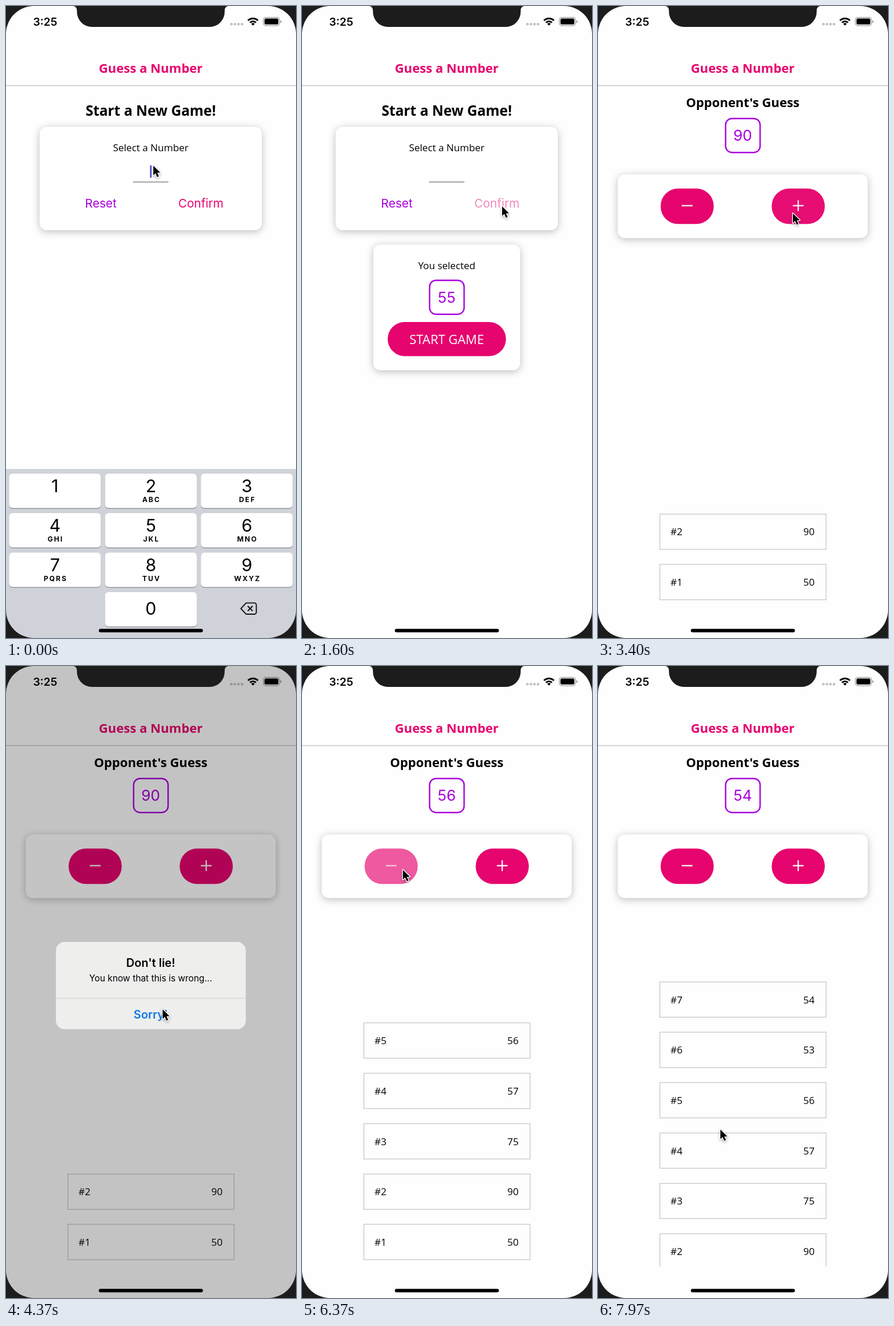
An HTML page with a canvas for the animation above (8000 ms loop, 500x1088 px).

```html
<!DOCTYPE html>
<html lang="en">
<head>
<meta charset="utf-8">
<title>Guess a Number</title>
<style>
  html, body { margin: 0; width: 100%; height: 100%; overflow: hidden; background: #1c1c1c; }
  canvas { display: block; width: 500px; height: 1088px; }
</style>
</head>
<body>
<canvas id="stage"></canvas>
<script>
const W = 500, H = 1088, LOOP = 8000, MID = 249.5;
const PRIMARY = '#e6046e', ACCENT = '#aa00dd', FRAME = '#1c1c1c';
const SANS = '"Open Sans", sans-serif', SYSTEM = 'Inter, sans-serif';

const canvas = document.getElementById('stage');
const ctx = canvas.getContext('2d');
const dpr = window.devicePixelRatio || 1;
canvas.width = W * dpr;
canvas.height = H * dpr;

// Timeline, in ms
const KEYS_TYPED = [300, 560];
const CONFIRMED = 1340;
const GAME_START = 2300;
const ALERT_IN = 3560, ALERT_OUT = 4520;
const DRAG_START = 7690;
const GUESSES = [
  [GAME_START, 50], [3200, 90], [4950, 75], [5230, 57],
  [5850, 56], [6400, 53], [7200, 54]
];
const PLUS_TAPS = [3200, 3550, 7200];
const MINUS_TAPS = [4950, 5230, 5850, 6400];

// Pointer moves: from time, to time, target x, target y
const MOVES = [
  [0, 0, 253, 274],
  [800, 1130, 344, 344],
  [1690, 2010, 262, 574],
  [2670, 3000, 335, 356],
  [3850, 4220, 269, 590],
  [4560, 4840, 173, 350],
  [6600, 7000, 320, 366],
  [7460, 7680, 210, 573],
  [DRAG_START, 7970, 210, 797]
];

const clamp = v => Math.max(0, Math.min(1, v));
const mix = (a, b, k) => a + (b - a) * k;
const ease = (t, from, to) => {
  const k = clamp((t - from) / Math.max(1, to - from));
  return k * k * (3 - 2 * k);
};

// Opacity of a touchable around a tap
function tapFade(t, down, up, low, back = 250) {
  if (t < up) return mix(1, low, ease(t, down, down + 80));
  return mix(low, 1, ease(t, up, up + back));
}

function tapsFade(t, taps) {
  return Math.min(...taps.map(up => tapFade(t, up - 90, up, 0.6)));
}

function pointerAt(t) {
  let [, , x, y] = MOVES[0];
  for (const [from, to, nx, ny] of MOVES) {
    if (t < from) break;
    const k = ease(t, from, to);
    x = mix(x, nx, k);
    y = mix(y, ny, k);
  }
  return { x, y };
}

function faded(alpha, draw) {
  ctx.save();
  ctx.globalAlpha *= alpha;
  draw();
  ctx.restore();
}

function box(x, y, w, h, r, fill, stroke, line = 1.2) {
  ctx.beginPath();
  ctx.roundRect(x, y, w, h, r);
  if (fill) { ctx.fillStyle = fill; ctx.fill(); }
  if (stroke) { ctx.strokeStyle = stroke; ctx.lineWidth = line; ctx.stroke(); }
}

function rule(x1, y1, x2, y2, color, width) {
  ctx.beginPath();
  ctx.moveTo(x1, y1);
  ctx.lineTo(x2, y2);
  ctx.strokeStyle = color;
  ctx.lineWidth = width;
  ctx.stroke();
}

// Text whose capitals are centred on y
function text(str, x, y, size, { family = SANS, weight = 400, color = '#000', align = 'center', gap = 0 } = {}) {
  ctx.font = `${weight} ${size}px ${family}`;
  ctx.textAlign = align;
  ctx.letterSpacing = gap + 'px';
  ctx.fillStyle = color;
  ctx.fillText(str, x, y + size * 0.36);
  ctx.letterSpacing = '0px';
}

function card(x, y, w, h) {
  ctx.save();
  ctx.shadowColor = 'rgba(0,0,0,0.26)';
  ctx.shadowBlur = 14 * dpr;
  ctx.shadowOffsetY = 2.4 * dpr;
  box(x, y, w, h, 12, '#fff');
  ctx.restore();
}

function numberBox(n, y) {
  box(220, y + 1.2, 59.5, 58.5, 11, null, ACCENT, 2.4);
  text(n, MID, y + 30.5, 26, { family: SYSTEM, color: ACCENT });
}

function header() {
  text('Guess a Number', MID, 107.3, 21.75, { weight: 700, color: PRIMARY });
  rule(0, 137, W, 137, '#c8c8c8', 1.4);
}

function startScreen(t) {
  text('Start a New Game!', MID, 180, 24.2, { weight: 700 });
  card(58, 208, 383, 178);
  text('Select a Number', MID, 244, 16.9);
  rule(219, 303, 280, 303, '#888', 1.3);

  if (t < CONFIRMED) {
    const typed = KEYS_TYPED.filter(k => t >= k);
    const half = typed.length * 4.9;
    text('5'.repeat(typed.length), MID, 285, 16, { family: SYSTEM });
    const since = t - (typed[typed.length - 1] || 0);
    if (since % 1000 < 600) box(MID + half - 1.2, 274, 2.6, 22, 1, '#4b52e2');
  }

  text('Reset', 163.5, 339.7, 20.5, { family: SYSTEM, color: ACCENT });
  faded(tapFade(t, 1230, 1530, 0.2, 180), () =>
    text('Confirm', 336, 339.7, 20.5, { family: SYSTEM, color: PRIMARY }));

  if (t >= CONFIRMED) {
    card(123, 410.5, 253, 216.5);
    text('You selected', MID, 447, 16.9);
    numberBox('55', 471);
    faded(tapFade(t, GAME_START - 130, GAME_START, 0.6), () => {
      box(147.7, 544, 204, 58.7, 29.3, PRIMARY);
      text('START GAME', MID, 574, 21.75, { color: '#fff' });
    });
  }
  keyboard(ease(t, CONFIRMED, CONFIRMED + 240) * 292);
}

function keyboard(drop) {
  if (drop > 291) return;
  const letters = ['', 'ABC', 'DEF', 'GHI', 'JKL', 'MNO', 'PQRS', 'TUV', 'WXYZ'];
  const key = (col, row) => {
    const x = 5.3 + col * 165.4, y = 805 + row * 68;
    box(x, y + 1.3, 158.2, 59.3, 6, '#898a8d');
    box(x, y, 158.2, 59.3, 6, '#fff');
    return [x + 79.1, y];
  };
  ctx.save();
  ctx.translate(0, drop);
  ctx.fillStyle = '#d0d2d9';
  ctx.fillRect(0, 797, W, H - 797);
  letters.forEach((abc, i) => {
    const [x, y] = key(i % 3, Math.floor(i / 3));
    text(String(i + 1), x, y + 21, 30, { family: SYSTEM });
    text(abc, x + 1, y + 45, 12, { family: SYSTEM, weight: 700, gap: 2 });
  });
  const [x, y] = key(1, 3);
  text('0', x, y + 28.5, 30, { family: SYSTEM });

  ctx.beginPath();
  ctx.moveTo(405, 1037.3);
  ctx.lineTo(413, 1028.6);
  ctx.arcTo(414, 1027.6, 416, 1027.6, 3);
  ctx.arcTo(431.6, 1027.6, 431.6, 1037, 3.5);
  ctx.arcTo(431.6, 1047, 420, 1047, 3.5);
  ctx.arcTo(414, 1047, 405, 1037.3, 3);
  ctx.closePath();
  ctx.lineJoin = 'round';
  ctx.strokeStyle = '#111';
  ctx.lineWidth = 1.9;
  ctx.stroke();
  rule(416.8, 1033, 425.2, 1041.5, '#111', 1.9);
  rule(425.2, 1033, 416.8, 1041.5, '#111', 1.9);
  ctx.restore();
}

function gameScreen(t, pointer) {
  const shown = GUESSES.filter(g => t >= g[0]);
  text("Opponent's Guess", MID, 166, 21.75, { weight: 700 });
  numberBox(String(shown[shown.length - 1][1]), 192.5);
  card(34, 290, 431, 109.5);

  [[108, MINUS_TAPS], [299.5, PLUS_TAPS]].forEach(([x, taps], i) => {
    faded(tapsFade(t, taps), () => {
      box(x, 314.3, 91.5, 61, 30, PRIMARY);
      const cx = x + 45.7, cy = 343.7;
      rule(cx - 9.3, cy, cx + 9.3, cy, '#fff', 2.2);
      if (i) rule(cx, cy - 9.3, cx, cy + 9.3, '#fff', 2.2);
    });
  });

  // Overscroll resists more the further the list is pulled
  const reach = 620;
  const pull = t < DRAG_START ? 0 : pointer.y - 573;
  const shift = reach * (1 - 1 / (pull * 0.55 / reach + 1));
  ctx.save();
  ctx.beginPath();
  ctx.rect(0, 412, W, 622);
  ctx.clip();
  shown.forEach(([, n], i) => {
    const y = 961.2 - 86.7 * i + shift;
    box(106.6, y, 286.6, 60.8, 0, null, '#c6c6c6', 1.25);
    text('#' + (i + 1), 125, y + 30.7, 16.9, { align: 'left' });
    text(String(n), 373.3, y + 30.7, 16.9, { align: 'right' });
  });
  ctx.restore();
}

function alertBox(t) {
  const rise = ease(t, ALERT_IN, ALERT_IN + 240);
  const alpha = rise * (1 - ease(t, ALERT_OUT, ALERT_OUT + 230));
  if (alpha <= 0) return;
  faded(alpha, () => {
    ctx.fillStyle = 'rgba(0,0,0,0.23)';
    ctx.fillRect(0, 0, W, H);
    const scale = mix(1.15, 1, rise);
    ctx.translate(MID, 550);
    ctx.scale(scale, scale);
    ctx.translate(-MID, -550);
    box(86, 475, 327.5, 150.3, 15, '#eeeeed');
    if (t > ALERT_OUT - 90) box(86, 572, 327.5, 53.3, [0, 0, 15, 15], '#dededd');
    rule(86, 572, 413.5, 572, '#cdcdcd', 1.2);
    text("Don't lie!", MID, 511, 19.7, { family: SYSTEM, weight: 600 });
    text('You know that this is wrong...', MID, 537, 15.3, { family: SYSTEM });
    text('Sorry!', MID, 599.7, 19.7, { family: SYSTEM, weight: 600, color: '#0f78ea' });
  });
}

function statusBar() {
  text('3:25', 67.5, 27, 19, { family: SYSTEM, weight: 600 });
  for (let i = 0; i < 4; i++) box(386.3 + i * 6.1, 29, 4.6, 4.6, 2.3, 'rgba(0,0,0,0.24)');

  const wave = (r, width) => {
    ctx.beginPath();
    ctx.arc(425.8, 33.7, r, -Math.PI * 0.75, -Math.PI * 0.25);
    ctx.strokeStyle = '#000';
    ctx.lineWidth = width;
    ctx.stroke();
  };
  wave(2.2, 4.4);
  wave(7.3, 2.9);
  wave(12.2, 2.9);

  box(443.6, 19.6, 28, 14.2, 4.4, null, 'rgba(0,0,0,0.4)', 1.2);
  box(445.6, 21.6, 24, 10.2, 2.6, '#000');
  box(473.2, 24.4, 1.7, 4.8, [0, 2, 2, 0], 'rgba(0,0,0,0.4)');
}

function phoneFrame() {
  box(160, 1072.3, 179.5, 6, 3, '#000');
  ctx.fillStyle = FRAME;
  ctx.beginPath();
  ctx.rect(0, 0, W, H);
  ctx.roundRect(0, 0, W, H, 48);
  ctx.fill('evenodd');

  ctx.beginPath();
  ctx.moveTo(114, -1);
  ctx.lineTo(114, 0);
  ctx.arcTo(122.3, 0, 122.3, 9, 7);
  ctx.arcTo(122.3, 36, 150, 36, 26);
  ctx.arcTo(377, 36, 377, 9, 26);
  ctx.arcTo(377, 0, 385, 0, 7);
  ctx.lineTo(385, -1);
  ctx.fill();
}

function arrow({ x, y }) {
  ctx.save();
  ctx.translate(x + 1, y + 1);
  ctx.beginPath();
  [[0, 0], [0, 16.6], [3.8, 13], [6.6, 19.6], [9.6, 18.3], [6.8, 11.9], [11.9, 11.7]]
    .forEach(p => ctx.lineTo(...p));
  ctx.closePath();
  ctx.lineJoin = 'round';
  ctx.shadowColor = 'rgba(0,0,0,0.35)';
  ctx.shadowBlur = 4 * dpr;
  ctx.shadowOffsetY = 1.5 * dpr;
  ctx.strokeStyle = '#fff';
  ctx.lineWidth = 2.6;
  ctx.stroke();
  ctx.shadowColor = 'transparent';
  ctx.fillStyle = '#000';
  ctx.fill();
  ctx.restore();
}

function draw(now) {
  const t = now % LOOP;
  const pointer = pointerAt(t);
  ctx.setTransform(dpr, 0, 0, dpr, 0, 0);
  ctx.fillStyle = '#fefefe';
  ctx.fillRect(0, 0, W, H);
  header();
  if (t < GAME_START) startScreen(t);
  else gameScreen(t, pointer);
  statusBar();
  alertBox(t);
  phoneFrame();
  arrow(pointer);
  requestAnimationFrame(draw);
}

requestAnimationFrame(draw);
</script>
</body>
</html>
```
